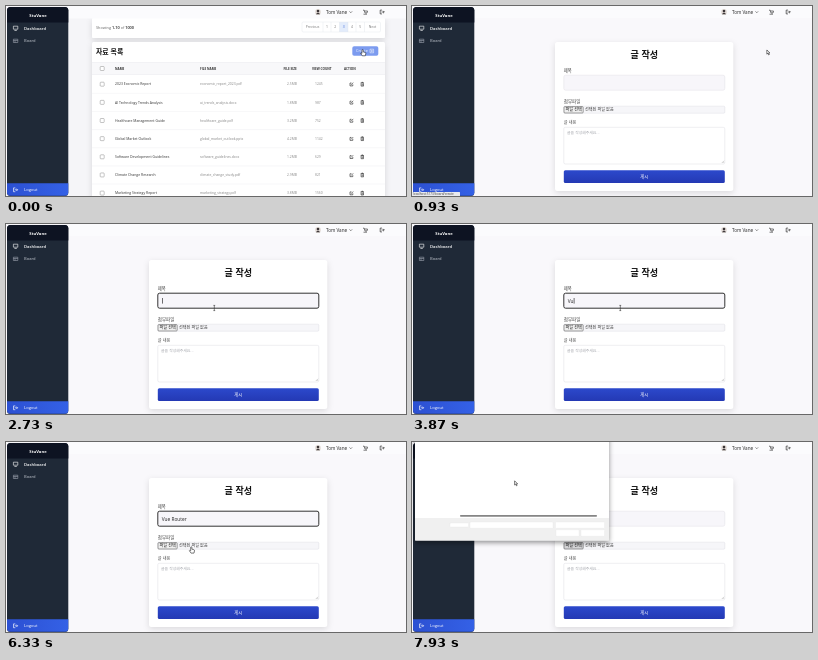
Write an HTML page that moves like this. It is 400 px wide and 190 px high and loops after 8 s.

```html
<!DOCTYPE html>
<html lang="ko">
<head>
<meta charset="utf-8">
<title>글 작성</title>
<style>
  html, body { margin: 0; width: 100%; height: 100%; overflow: hidden; background: #f9f8fb; }
  svg { display: block; width: 100vw; height: 100vh; }
  text { font-family: "Open Sans", "Noto Sans CJK KR", "Noto Sans CJK", sans-serif; white-space: pre; }
  .ko { font-family: "Noto Sans CJK KR", "Noto Sans CJK", sans-serif; }
  .card { filter: drop-shadow(0 2px 3px #0000001f); }
  .window { filter: drop-shadow(0 2px 2.5px #00000070); }
</style>
</head>
<body>
<svg id="stage" viewBox="0 0 400 190">
  <defs>
    <linearGradient id="post" x2="0" y2="1">
      <stop stop-color="#2c49cc"/><stop offset="1" stop-color="#2439b4"/>
    </linearGradient>
    <linearGradient id="foot" x2="1">
      <stop stop-color="#2c50d2"/><stop offset="1" stop-color="#3461e6"/>
    </linearGradient>
  </defs>
</svg>
<script>
const LOOP = 8000;
const stage = document.getElementById('stage');

function add(parent, tag, attrs = {}) {
  const el = document.createElementNS('http://www.w3.org/2000/svg', tag);
  for (const key in attrs) el.setAttribute(key, attrs[key]);
  parent.append(el);
  return el;
}
const group = (parent, attrs) => add(parent, 'g', attrs);
const box = (p, x, y, width, height, fill, more) =>
  add(p, 'rect', { x, y, width, height, fill, ...more });
const line = (p, d, stroke, width = .5, more) =>
  add(p, 'path', { d, stroke, 'stroke-width': width, fill: 'none', ...more });

// y is the visual middle of the text
function label(p, x, y, string, size, fill, more) {
  const el = add(p, 'text', { x, y: y + size * .36, 'font-size': size, fill, ...more });
  el.textContent = string;
  return el;
}
const BOLD = { 'font-weight': 700 }, SEMI = { 'font-weight': 600 };
const MIDDLE = { 'text-anchor': 'middle' };
const KO = { class: 'ko' };
const show = (el, on) => el.setAttribute('visibility', on ? 'visible' : 'hidden');

function exitIcon(p, x, y, color) {
  line(p, `M${x} ${y - 1.9}h-1.8v3.8h1.8M${x - .6} ${y}h2.8m-1.1 -1.2l1.2 1.2l-1.2 1.2`, color, .65);
}

function editIcon(p, x, y) {
  line(p, `M${x} ${y - 1.2}h-1.5v2.9h2.8v-1.5M${x - .3} ${y + .6}l2 -2.2`, '#222', .6);
}

function drawHeader() {
  const g = group(stage);
  box(g, 62, 0, 338, 12, '#fbfbfd');
  add(g, 'circle', { cx: 312, cy: 6, r: 2.9, fill: '#e3dcd8' });
  add(g, 'circle', { cx: 312, cy: 5.1, r: 1.3, fill: '#3a3436' });
  add(g, 'path', { d: 'M309.8 8.3q2.2 -3 4.4 0z', fill: '#3a3436' });
  label(g, 320, 6.2, 'Tom Vane', 4.6, '#222');
  line(g, 'M343.5 5.4l1.3 1.3l1.3 -1.3', '#333', .6);
  line(g, 'M357 4.2h1.2l.8 2.8h2l.5 -2h-3M357.5 8.2h3.5', '#222', .6);
  exitIcon(g, 376, 6, '#222');
}

function drawSidebar() {
  const g = group(stage);
  box(g, 1, 1, 61.3, 189, '#1f2937', { rx: 3.5 });
  add(g, 'path', { d: 'M1 16.5V4.5q0 -3.5 3.5 -3.5h54.3q3.5 0 3.5 3.5v12z', fill: '#0d1322' });
  label(g, 32, 9, 'StuVane', 4.2, '#fff', { ...BOLD, ...MIDDLE });
  line(g, 'M7.4 20.2h4.4v3h-4.4zM8.4 24.5h2.4', '#fff', .6);
  label(g, 18, 22, 'Dashboard', 4.2, '#fff', SEMI);
  line(g, 'M7.4 33.2h4.4v3.3h-4.4zM7.4 34.5h4.4M9 34.5v2', '#aeb5c0', .5);
  label(g, 18, 35, 'Board', 4.1, '#c5cad2');
  add(g, 'path', { d: 'M1 177.3h61.3v9q0 3.5 -3.5 3.5h-54.3q-3.5 0 -3.5 -3.5z', fill: 'url(#foot)' });
  exitIcon(g, 9.3, 183.8, '#fff');
  label(g, 18, 183.8, 'Logout', 4.2, '#fff');
}

const FILES = [
  ['2023 Economic Report', 'economic_report_2023.pdf', '2.5MB', '1245'],
  ['AI Technology Trends Analysis', 'ai_trends_analysis.docx', '1.8MB', '987'],
  ['Healthcare Management Guide', 'healthcare_guide.pdf', '3.2MB', '752'],
  ['Global Market Outlook', 'global_market_outlook.pptx', '4.2MB', '1142'],
  ['Software Development Guidelines', 'software_guidelines.docx', '1.2MB', '629'],
  ['Climate Change Research', 'climate_change_study.pdf', '2.9MB', '821'],
  ['Marketing Strategy Report', 'marketing_strategy.pdf', '3.8MB', '1560']
];

function drawPager(g) {
  const edges = [296, 317, 325, 333.5, 342, 350, 358.5, 374.5];
  const names = ['Previous', '1', '2', '3', '4', '5', 'Next'];
  box(g, 333.5, 16, 8.5, 10, '#e3ecfb');
  names.forEach((name, i) => {
    label(g, (edges[i] + edges[i + 1]) / 2, 21, name, 3.4, i === 3 ? '#3b67d8' : '#777', MIDDLE);
    if (i) line(g, `M${edges[i]} 16v10`, '#dfe2e7', .4);
  });
  box(g, 296, 16, 78.5, 10, 'none', { rx: 1.3, stroke: '#dfe2e7', 'stroke-width': .4 });
}

function drawList() {
  const g = group(stage);
  box(g, 62.3, 12, 337.7, 178, '#f5f5f8');
  box(g, 86, 12, 293, 20, '#fff', { class: 'card', rx: 1 });
  box(g, 62.3, 0, 337.7, 12.5, '#fbfbfd');
  const count = label(g, 90, 21.3, '', 3.8, '#666');
  [['Showing '], ['1-10', 1], [' of '], ['1000', 1]].forEach(([word, strong]) => {
    add(count, 'tspan', strong ? { ...SEMI, fill: '#222' } : {}).textContent = word;
  });
  drawPager(g);

  box(g, 86, 36, 293, 160, '#fff', { class: 'card', rx: 1.5 });
  label(g, 90, 45.5, '자료 목록', 6.9, '#151515', { ...KO, ...BOLD });
  box(g, 86, 56.5, 293, 12, '#f8f8fa');
  line(g, 'M86 56.5h293M86 68.5h293', '#e8e9ec', .5);
  const columns = { 109: 'NAME', 194: 'FILE NAME', 277.5: 'FILE SIZE', 306: 'VIEW COUNT', 338: 'ACTION' };
  for (const x in columns) label(g, x, 62.5, columns[x], 3.1, '#333', BOLD);
  const check = y => box(g, 94.2, y - 2, 4, 4, '#fff', { rx: .7, stroke: '#888', 'stroke-width': .5 });
  check(62.5);

  FILES.forEach(([name, file, size, views], i) => {
    const y = 78.2 + 18.15 * i;
    check(y);
    label(g, 109, y, name, 3.45, '#333');
    label(g, 194, y, file, 3.35, '#858585');
    label(g, 281, y, size, 3.35, '#858585');
    label(g, 309, y, views, 3.35, '#858585');
    editIcon(g, 345.5, y);
    line(g, `M354.6 ${y - 1.3}h3.4m-1.2 0v-.6h-1v.6M355.1 ${y - .8}v2.7h2.4v-2.7M356.3 ${y - .5}v2`, '#222', .6);
    line(g, `M86 ${y + 9.1}h293`, '#efeff2', .5);
  });
  const button = group(g);
  box(button, 346.3, 40.2, 26, 9.6, '#4a76ea', { rx: 1.8 });
  label(button, 350, 45, 'Create', 3.9, '#fff');
  line(button, 'M364 43.2h3.6v3.6h-3.6zM365.8 44v2M364.8 45h2', '#fff', .5);
  return { g, button };
}

function drawForm() {
  const g = group(stage);
  const text = (x, y, string, size, fill, more) => label(g, x, y, string, size, fill, { ...KO, ...more });
  const edge = { stroke: '#dddde3', 'stroke-width': .5 };
  box(g, 143, 36, 178.3, 149, '#fff', { class: 'card', rx: 2.5 });
  text(232.3, 48.3, '글 작성', 9, '#111', { ...BOLD, ...MIDDLE });
  text(151.8, 64.3, '제목', 4.3, '#333');
  const field = box(g, 151.8, 69.2, 161, 15, '#f7f6fa', { rx: 1.8 });
  const value = label(g, 155.8, 76.8, '', 4.8, '#222');
  const caret = box(g, 0, 74, .6, 5.6, '#111');
  text(151.8, 95.5, '첨부파일', 4.5, '#444');
  box(g, 151.8, 100.2, 161, 7, '#f6f6f9', { rx: 1, ...edge });
  const pick = box(g, 152, 100.6, 19.2, 6.4, '#efefef', { rx: .9, stroke: '#444', 'stroke-width': .5 });
  text(161.6, 103.8, '파일 선택', 4.1, '#111', MIDDLE);
  text(173, 103.8, '선택된 파일 없음', 4.1, '#333');
  text(151.8, 116.6, '글 내용', 4.1, '#444');
  box(g, 151.8, 121.3, 161, 36.7, '#fff', { rx: 1.5, ...edge });
  text(155, 126.2, '글을 작성해주세요...', 3.85, '#a5a7ad');
  line(g, 'M309.8 157l2.2 -2.2M311.2 157l.8 -.8', '#888', .4);
  box(g, 151.8, 164.2, 161, 12.8, 'url(#post)', { rx: 1.5 });
  text(232.3, 170.5, '게시', 4.4, '#fff', MIDDLE);
  return { g, field, value, caret, pick };
}

function drawDialog() {
  const g = group(stage);
  box(g, 3, -6, 194, 104.5, '#fff', { class: 'window', rx: 1 });
  box(g, 3, 76, 194, 22.5, '#f0f0f0');
  box(g, 48, 73, 137, 1.7, '#858585', { rx: .8 });
  const edge = { stroke: '#e2e2e2', 'stroke-width': .3 };
  for (const [x, y, w, h] of [[38, 81, 18.5, 4], [58, 80, 83, 6.3], [143.5, 80, 49, 6.3],
    [144, 87.7, 23, 6.6], [169, 87.7, 23.5, 6.6]]) box(g, x, y, w, h, '#fff', { rx: .6, ...edge });
  return g;
}

// Origin of each pointer is its hot spot
function drawPointers() {
  const arrow = group(stage), hand = group(stage), beam = group(stage);
  const skin = { fill: '#fff', stroke: '#111', 'stroke-width': .55, 'stroke-linejoin': 'round' };
  add(arrow, 'path', { d: 'M0 0v4.2l1 -.9l.8 1.7l.7 -.4l-.8 -1.6h1.3z', ...skin });
  add(hand, 'path', {
    d: 'M-.5 .4q.6 -.8 1.2 0v2l2 .5q.7 .3 .6 1l-.5 2.4h-3l-1.7 -2.4q.2 -.8 1.4 0z', ...skin
  });
  line(beam, 'M-.9 -2.6h1.8M0 -2.6v5.2M-.9 2.6h1.8', '#333', .6);
  return { arrow, hand, beam };
}

// [time, x, y]
const PATH = [
  [0, 356.5, 43.5], [890, 356.5, 43.5], [1550, 208.3, 84], [5750, 208.3, 84],
  [6070, 188.5, 99], [6250, 185.2, 104.8], [7030, 185.2, 104.8],
  [7500, 116.8, 53.4], [7800, 116.8, 53.4], [7930, 102.6, 38.8]
];
// [time, pointer]
const POINTERS = [[0, 'hand'], [870, 'arrow'], [1500, 'beam'], [5800, 'arrow'], [6070, 'hand'], [7090, 'arrow']];
const KEYS = [3670, 3800, 4400, 4530, 4670, 4800, 4930, 5070, 5200, 5380];
const TITLE = 'Vue Router';

function pointerAt(time) {
  let i = PATH.findLastIndex(step => step[0] <= time);
  const a = PATH[i], b = PATH[i + 1] || a;
  const p = b === a ? 0 : (time - a[0]) / (b[0] - a[0]);
  const e = p * p * (3 - 2 * p);
  return [a[1] + (b[1] - a[1]) * e, a[2] + (b[2] - a[2]) * e];
}

drawHeader();
const list = drawList();
const form = drawForm();
drawHeader();
drawSidebar();
const status = group(stage);
box(status, 0, 186, 48, 4, '#e9eaee', { rx: .5 });
label(status, 1, 188, 'localhost:5173/board/create', 3.1, '#444');
const dialog = drawDialog();
const pointers = drawPointers();

function render(time) {
  const onList = time < 800;
  show(list.g, onList);
  show(form.g, !onList);
  show(status, time >= 470 && time < 1200);
  show(dialog, time >= 7870);
  list.button.setAttribute('opacity', .72 + .28 * Math.min(1, Math.max(0, (time - 70) / 200)));

  const focused = time >= 2300 && time < 7060;
  form.field.setAttribute('stroke', focused ? '#1c1c1c' : '#e0dfe5');
  form.field.setAttribute('stroke-width', focused ? .9 : .5);
  form.pick.setAttribute('fill', time >= 7060 ? '#d6d6d8' : '#efefef');

  const typed = KEYS.filter(key => key <= time).length;
  form.value.textContent = TITLE.slice(0, typed);
  const since = time - (typed ? KEYS[typed - 1] : 2300);
  form.caret.setAttribute('x', 156 + (typed ? form.value.getComputedTextLength() : 0));
  show(form.caret, focused && since % 1000 < 500);

  const [x, y] = pointerAt(time);
  const kind = POINTERS.findLast(step => step[0] <= time)[1];
  for (const name in pointers) show(pointers[name], name === kind);
  pointers[kind].setAttribute('transform', `translate(${x} ${y})`);
}

const start = performance.now();
function tick() {
  render((performance.now() - start) % LOOP);
  requestAnimationFrame(tick);
}
tick();
</script>
</body>
</html>
```
